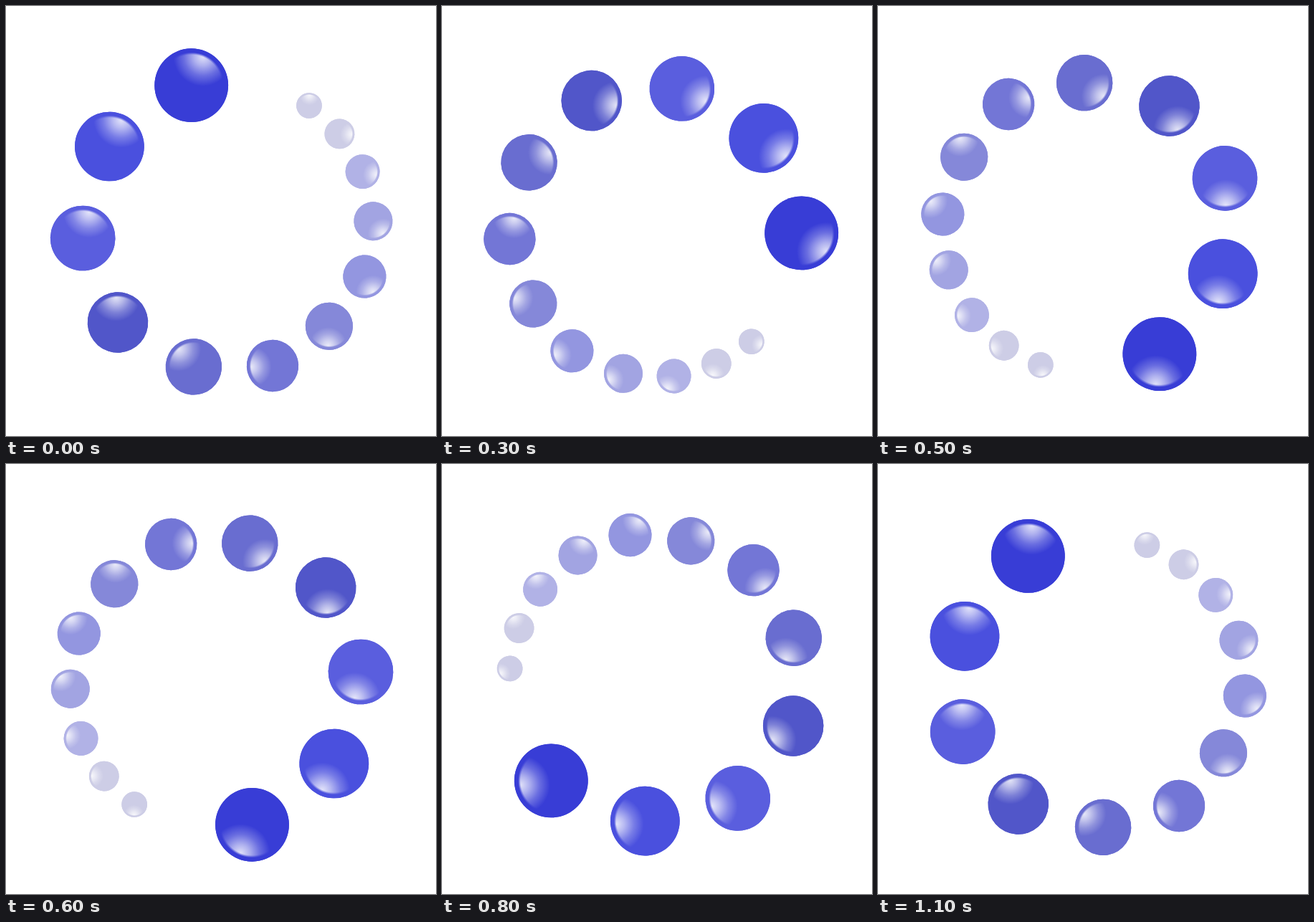
An HTML page with a canvas for the animation above (1.2 s loop, 600 by 600 pixels).

```html
<!DOCTYPE html>
<html lang="en">
<head>
<meta charset="utf-8">
<title>Loading ring</title>
<style>
  html, body { margin: 0; width: 100%; height: 100%; overflow: hidden; background: #fff; }
  canvas { display: block; }
</style>
</head>
<body>
<canvas id="stage" width="600" height="600"></canvas>
<script>
const ctx = document.getElementById('stage').getContext('2d');
const RAD = Math.PI / 180;
const CX = 301.1, CY = 307;
const STEP_MS = 100;
// Ring turn at each step, in units of 15 degrees
const TURNS = [0, 2, 5, 7, 9, 11, 12, 14, 16, 18, 20, 23];

// Offset from the ring centre, direction of the shine (clockwise from up), colour
const BALLS = [
  [-42.4, -196.3, 22, '56,61,214'],
  [-156.7, -111, 24, '74,80,222'],
  [-193.9, 17, 13, '90,94,222'],
  [-145.1, 134.5, -4, '81,86,201'],
  [-39.2, 196.4, -40, '105,109,208'],
  [70.9, 195, -93, '115,118,214'],
  [149.8, 139.8, 183, '133,136,217'],
  [199.3, 70.5, 152, '147,150,224'],
  [211.3, -6.8, 142, '162,164,226'],
  [196.5, -75.9, 102, '177,178,230'],
  [164.3, -128.6, 92, '205,205,230'],
  [121.9, -168, 2, '205,205,230']
];

function disc(r, fill) {
  ctx.fillStyle = fill;
  ctx.beginPath();
  ctx.arc(0, 0, r, 0, Math.PI * 2);
  ctx.fill();
}

function drawBall([x, y, dir, rgb], i) {
  const r = 51.4 - 3.05 * i;
  ctx.save();
  ctx.translate(x, y);
  ctx.rotate(dir * RAD);
  disc(r, `rgb(${rgb})`);

  const shine = ctx.createRadialGradient(0, -r * 0.84, 0, 0, -r * 0.84, r * 0.8);
  shine.addColorStop(0, 'rgba(255,255,255,0.85)');
  shine.addColorStop(0.3, 'rgba(255,255,255,0.6)');
  shine.addColorStop(0.65, 'rgba(255,255,255,0.25)');
  shine.addColorStop(1, 'rgba(255,255,255,0)');
  disc(r * 0.9, shine);

  // Rim that closes the shine softly
  const rim = ctx.createRadialGradient(0, 0, r * 0.83, 0, 0, r * 0.895);
  rim.addColorStop(0, `rgba(${rgb},0)`);
  rim.addColorStop(1, `rgba(${rgb},1)`);
  disc(r, rim);
  ctx.restore();
}

function draw(now) {
  const step = Math.floor(now / STEP_MS) % TURNS.length;
  ctx.fillStyle = '#fff';
  ctx.fillRect(0, 0, 600, 600);
  ctx.save();
  ctx.translate(CX, CY);
  ctx.rotate(TURNS[step] * 15 * RAD);
  BALLS.forEach(drawBall);
  ctx.restore();
}

let start;
function tick(now) {
  if (start === undefined) start = now;
  draw(now - start);
  requestAnimationFrame(tick);
}
draw(0);
requestAnimationFrame(tick);
</script>
</body>
</html>
```
